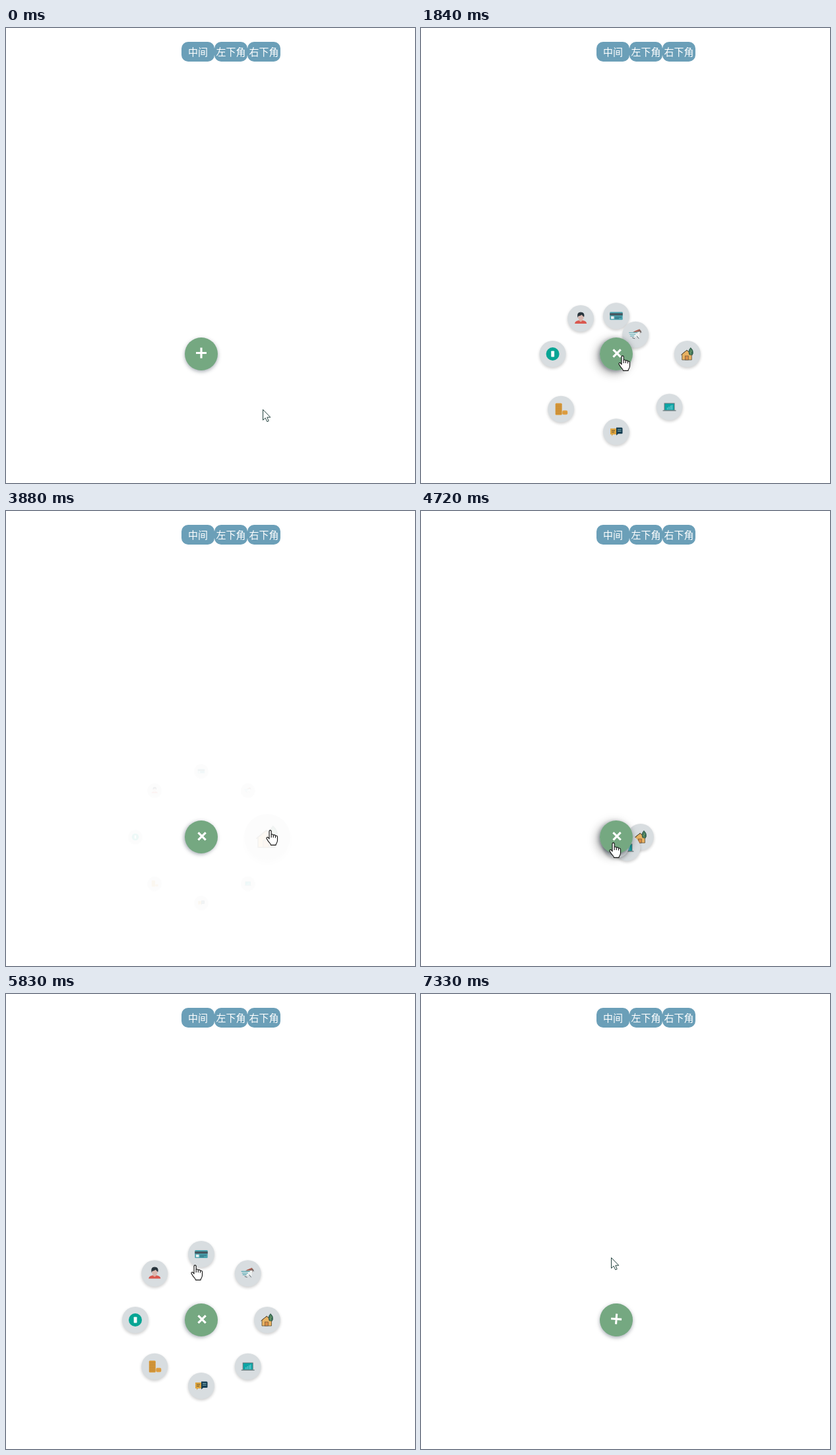
An HTML page that plays this animation: 620x691 px, repeating every 7.4 s.

```html
<!DOCTYPE html>
<html lang="zh">
<head>
<meta charset="utf-8">
<title>环形菜单</title>
<style>
  html, body { margin: 0; width: 100%; height: 100%; overflow: hidden; background: #fff; }
  #stage { position: relative; width: 620px; height: 691px; overflow: hidden; }
  #stage > * { position: absolute; }
  .tab {
    top: 21px; width: 50px; height: 30px; border-radius: 10px;
    background: #6b9fb8; color: #fff; text-align: center; white-space: nowrap;
    font: 500 15px/29px "Noto Sans CJK SC", "Noto Sans CJK", sans-serif;
  }
  .item {
    left: 276px; top: 475px; width: 40px; height: 40px; border-radius: 50%;
    background: #d8dde0;
  }
  .item svg { position: absolute; left: 10px; top: 10px; width: 20px; height: 20px; overflow: visible; }
  #main { left: 271px; top: 470px; width: 50px; height: 50px; }
  #main > * { position: absolute; inset: 0; border-radius: 50%; }
  #lift { box-shadow: 0 6px 14px rgba(0,0,0,.2), 0 5px 18px rgba(0,0,0,.15); }
  #face { background: #75a881; box-shadow: 0 2px 5px rgba(40,60,80,.32), 0 2px 8px rgba(0,0,0,.1); }
  #overlay { left: 0; top: 0; }
</style>
</head>
<body>
<div id="stage">
  <div class="tab" style="left:266px">中间</div>
  <div class="tab" style="left:316px">左下角</div>
  <div class="tab" style="left:366px">右下角</div>
  <div id="main">
    <div id="lift"></div>
    <div id="face"></div>
    <svg width="50" height="50">
      <path d="M17 23.5H33M25 15.5V31.5" stroke="#fff" stroke-width="3.1"/>
    </svg>
  </div>
  <svg id="overlay" width="620" height="691">
    <circle id="click" r="12" fill="#ff0" fill-opacity=".47"/>
    <path id="arrow" d="M.5 .5V16.5L4.2 13.2 6.8 18.8 9.2 17.8 6.8 12.2H11.8Z"
      fill="#fff" stroke="#24433f" stroke-width="1"/>
    <g id="hand" fill="#fff" stroke="#111" stroke-width="1.1" stroke-linejoin="round">
      <path d="M-1 14V2.500Q-1 .9 .6 .9T2.200 2.500V7.500Q2.400 6.800 3.700 7T5.300 8.500Q5.700 7.500 7 7.900T8.500 9.400Q8.900 8.700 10.200 9.200T11.500 10.900V16Q11.500 18.500 10.300 20.200T9 23.400H1.500Q1.100 21.400 -.9 19.400T-4.100 14.800Q-5.900 12.600 -4.400 11.600T-1 14Z"/>
      <path d="M2.200 7.500V12M5.300 8.500V12M8.500 9.400V12.500" fill="none"/>
    </g>
  </svg>
</div>
<script>
const LOOP = 7400;
const CENTER = { x: 296, y: 495 };
const RADIUS = 100, PEAK = 120;
const STAGGER = 48, RISE = 412, FALL = 190, FADE = 500, SPIN = 300;

// each cycle opens the menu, then closes it by picking one item
const CYCLES = [
  { press: 910, open: 1240, pick: 3210, close: 3540, item: 0 },
  { press: 4140, open: 4470, pick: 6310, close: 6640, item: 6 }
];

// time, x, y of the pointer tip
const PATH = [
  [330, 389, 579], [900, 305, 497], [2390, 305, 497], [2460, 325, 487],
  [2800, 400, 484], [3890, 400, 484], [4130, 291, 503], [5440, 291, 503],
  [5760, 288, 417], [5830, 286, 411], [5970, 288, 400]
];

// clockwise from the right
const ICONS = [
  // house
  `<path d="M2 10V19H16.500V10L9.200 4.500Z" fill="#e9b262" stroke="#594c35" stroke-width=".8"/>
   <path d="M.5 11.500L9.200 4.300 18 11.500" fill="none" stroke="#594c35"/>
   <rect x="6.500" y="13" width="5" height="6" fill="#d98c45" stroke="#594c35" stroke-width=".6"/>
   <path d="M15 .5Q19.500 4.500 18.500 9.500 17 13 13 11 10.500 5 15 .5Z" fill="#396f56" stroke="#23473c" stroke-width=".6"/>
   <path d="M15.200 3V12M15.200 7l2-2M15.200 9l-2-2" fill="none" stroke="#9ac07e" stroke-width=".6"/>`,
  // laptop
  `<rect x="2" y="4" width="16" height="11.500" fill="#66777c"/>
   <rect x="3" y="5" width="14" height="10" fill="#0ca5a5"/>
   <path d="M7 14V11M9.500 14V9.500M12 14V8M14 14V7" stroke="#65c9d0" stroke-width="1.300"/>
   <path d="M0 15.500H20" stroke="#79898b" stroke-width="1.500"/>`,
  // messages
  `<path d="M1 5H10V14H5L3 16.500V14H1Z" fill="#dda43f"/>
   <path d="M10 3.500H18Q19.500 3.500 19.500 5V12Q19.500 13 18 13H13L10 15.500Z" fill="#173f53"/>
   <path d="M3 8H8M3 10.500H7" stroke="#6b562d"/>
   <path d="M12 6.500H17.500M12 9H17.500" stroke="#86b7bd"/>`,
  // coins
  `<rect x="1.500" y="1" width="10" height="18" rx="1.500" fill="#d99a39"/>
   <path d="M2 4H11M2 6.500H11M2 9H11M2 11.500H11M2 14H11M2 16.500H11" stroke="#b98236" stroke-width=".8"/>
   <rect x="12" y="12" width="8" height="6.500" rx="2" fill="#e0a044"/>
   <path d="M12.500 15.500H19.500" stroke="#c88d38" stroke-width=".7"/>`,
  // phone
  `<circle cx="10" cy="10" r="10" fill="#07a594"/>
   <rect x="7.700" y="5.500" width="4.800" height="9" rx=".7" fill="#fff"/>`,
  // person
  `<path d="M1 18Q1 14 7 13H13Q19 14 19 18Z" fill="#d9584f"/>
   <path d="M7.500 11H12.500V13.500L10 15.500 7.500 13.500Z" fill="#d9b0a5"/>
   <ellipse cx="10.200" cy="8" rx="4.300" ry="5.200" fill="#d9b8b0"/>
   <path d="M5.300 9Q3.500 .3 10 .3 16.800 .3 15 8 13.500 6.500 11.500 4.500 9 6.500 6.500 6.500Z" fill="#29353d"/>`,
  // card
  `<rect x=".3" y="4" width="19.400" height="12" rx="1" fill="#4ba3ae"/>
   <rect x=".3" y="6" width="19.400" height="3.300" fill="#46555e"/>
   <rect x="2" y="10.700" width="4.500" height="4" fill="#e8eff0"/>
   <path d="M8 12H18M8 14H14" stroke="#2c6574" stroke-width=".9"/>`,
  // megaphone
  `<path d="M6 6L16 1.500 19 5 16 9Z" fill="#8b6960"/>
   <path d="M1 7L17 5.500 15 16 12 12.500 7 14.500 8 12 1 11Z" fill="#edf1f1"/>
   <path d="M0 7H13M1 9.500H10M2 12H8" stroke="#4ca0aa" stroke-width="1.200"/>
   <path d="M5 14.500L9 16M12 12L15 16M16.500 4L19 7" stroke="#58636a"/>
   <path d="M9 5L16 2.500" stroke="#c45f50" stroke-width="1.200"/>`
];

const $ = id => document.getElementById(id);
const clamp = v => Math.min(1, Math.max(0, v));
const mix = (a, b, p) => a + (b - a) * p;
const within = (t, from, to) => t >= from && t < to;

function bezier(x1, y1, x2, y2) {
  const at = (a, b, s) => 3 * a * s * (1 - s) ** 2 + 3 * b * s * s * (1 - s) + s ** 3;
  return v => {
    const x = clamp(v);
    if (x === 0 || x === 1) return x;
    let lo = 0, hi = 1;
    for (let n = 0; n < 24; n++) {
      const mid = (lo + hi) / 2;
      if (at(x1, x2, mid) < x) lo = mid; else hi = mid;
    }
    return at(y1, y2, lo);
  };
}
const ease = bezier(.25, .1, .25, 1);
const easeIn = bezier(.42, 0, 1, 1);
const easeInOut = bezier(.42, 0, .58, 1);

const items = ICONS.map(icon => {
  const el = document.createElement('div');
  el.className = 'item';
  el.innerHTML = `<svg viewBox="0 0 20 20">${icon}</svg>`;
  $('stage').insertBefore(el, $('main'));
  return el;
});

function reach(ms) {
  if (ms < RISE) return PEAK * easeIn(ms / RISE);
  return mix(PEAK, RADIUS, easeIn((ms - RISE) / FALL));
}

function pointer(t) {
  const next = PATH.findIndex(p => p[0] > t);
  if (next === 0) return { x: PATH[0][1], y: PATH[0][2] };
  const [t0, x0, y0] = PATH.at(next < 0 ? -1 : next - 1);
  if (next < 0) return { x: x0, y: y0 };
  const [t1, x1, y1] = PATH[next];
  const p = easeInOut((t - t0) / (t1 - t0));
  return { x: mix(x0, x1, p), y: mix(y0, y1, p) };
}

function drawItems(t, cycle) {
  const fade = ease((t - cycle.close) / FADE);
  items.forEach((el, i) => {
    const r = reach(t - cycle.open - STAGGER * (i + 1));
    const a = i * Math.PI / 4;
    const scale = mix(1, i === cycle.item ? 1.8 : .5, fade);
    const hover = i === cycle.item ? clamp((t - cycle.pick + 400) / 150) : 0;
    el.style.visibility = within(t, cycle.open, cycle.close + FADE) ? 'visible' : 'hidden';
    el.style.opacity = 1 - fade;
    el.style.transform = `translate(${r * Math.cos(a)}px, ${r * Math.sin(a)}px) scale(${scale})`;
    el.style.boxShadow = `0 ${2 + hover}px ${4 + 2 * hover}px rgba(0,0,0,.2)`;
  });
}

function drawMain(t, cycle) {
  // the shadow turns together with the button
  const turn = ease((t - cycle.open) / SPIN) - ease((t - cycle.close - FADE) / SPIN);
  $('main').style.transform = `rotate(${45 * turn}deg)`;
  $('lift').style.opacity = clamp((t - 830) / 200) - clamp((t - 2420) / 220)
    + clamp((t - 4070) / 200) - clamp((t - 5520) / 220);
}

function drawPointer(t, cycle) {
  const { x, y } = pointer(t);
  const near = (cx, cy, r) => Math.hypot(x - cx, y - cy) < r;
  const a = cycle.item * Math.PI / 4;
  const overItem = within(t, cycle.open + 900, cycle.close + FADE + 40)
    && near(CENTER.x + RADIUS * Math.cos(a), CENTER.y + RADIUS * Math.sin(a), 24);
  const hand = overItem || near(CENTER.x, CENTER.y, 25);
  const pressed = within(t, cycle.press, cycle.press + 120)
    || within(t, cycle.pick, cycle.pick + 130);
  const show = (id, on) => {
    $(id).setAttribute('transform', `translate(${x} ${y})`);
    $(id).style.display = on ? '' : 'none';
  };
  show('hand', hand);
  show('arrow', !hand);
  show('click', pressed);
}

function render(t) {
  // the second press comes while the button is still turning back
  const first = t < CYCLES[0].close + FADE + SPIN;
  const cycle = CYCLES[first ? 0 : 1];
  drawItems(t, cycle);
  drawMain(t, cycle);
  drawPointer(t, CYCLES[t < CYCLES[1].press ? 0 : 1]);
}

const start = performance.now();
function tick() {
  render((performance.now() - start) % LOOP);
  requestAnimationFrame(tick);
}
tick();
</script>
</body>
</html>
```
